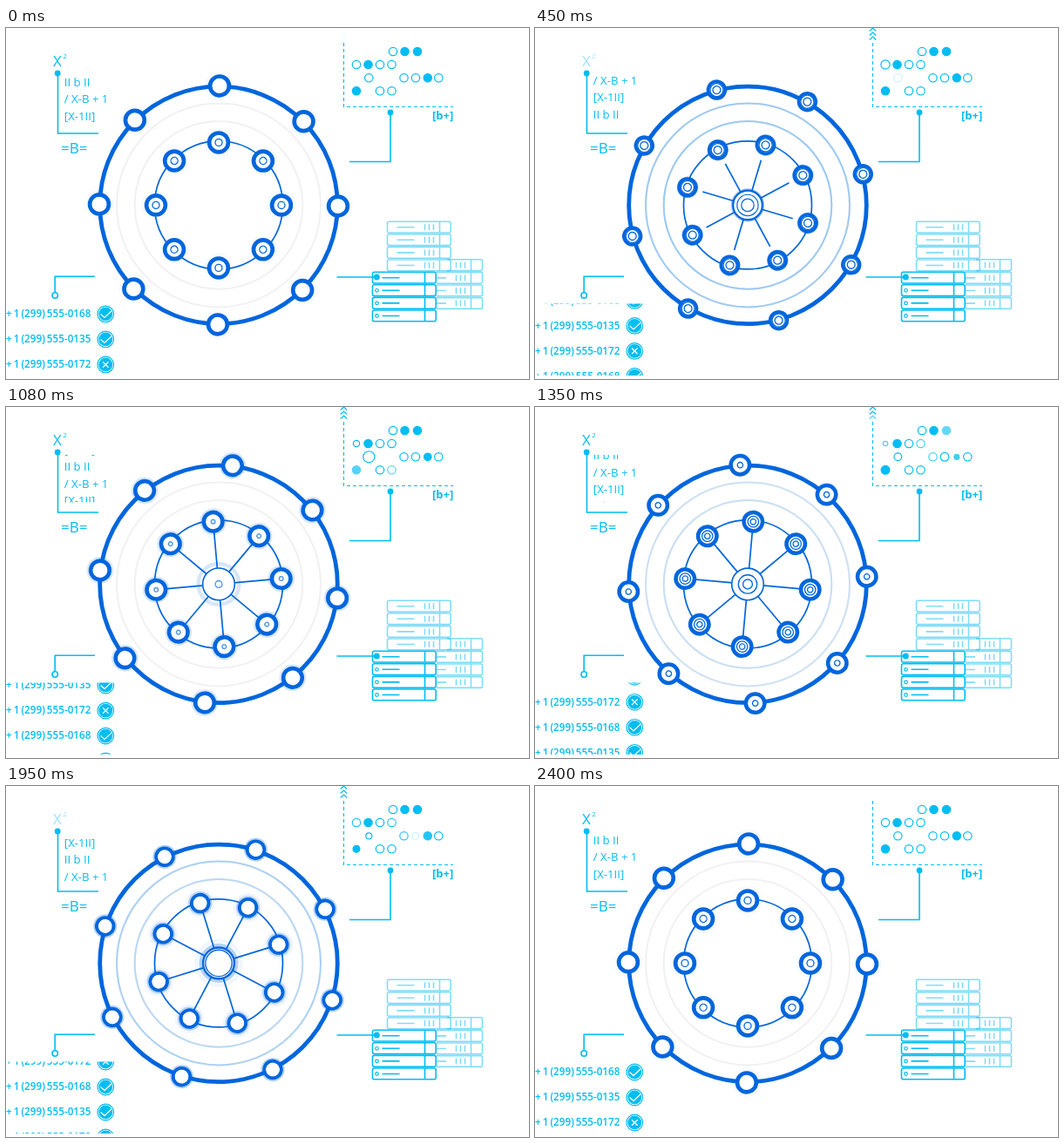
An HTML page for the animation above (2.43 s loop, 600 by 403 pixels).

```html
<!DOCTYPE html>
<html lang="en">
<head>
<meta charset="utf-8">
<title>Network pulse</title>
<style>
  html, body { margin: 0; width: 100%; height: 100%; overflow: hidden; background: #fff; }
  svg { display: block; width: 600px; height: 403px; font-family: "Open Sans", sans-serif; --sky: #00bdf2; --blue: #0066dd; }
  text { fill: var(--sky); white-space: pre; }
  .line { fill: none; stroke: var(--sky); stroke-width: 1.6; }
  .thin { stroke-width: 1.2; }
  .dot { fill: var(--sky); }
  .pale { opacity: .5; }
  .ring { fill: none; stroke: var(--blue); }
  .body { fill: #fff; }
  .track { fill: none; stroke: #f1f1f3; stroke-width: 2; }
  .glow { fill: none; stroke: #9cc9f3; stroke-width: 2; }
  .formula { font-size: 13.2px; }
  .phone { font-size: 11.7px; font-weight: 600; word-spacing: -1px; }
  .mark { fill: none; stroke: #fff; stroke-width: 1.3; }
</style>
</head>
<body>
<svg viewBox="0 0 600 403">
  <defs>
    <clipPath id="formulaClip"><rect x="62" y="55" width="70" height="54.5"/></clipPath>
    <clipPath id="phoneClip"><rect y="316.5" width="130" height="82.5"/></clipPath>
    <g id="outNode"></g>
    <g id="inNode"></g>
  </defs>

  <g id="power">
    <text x="54" y="44" font-size="17">X</text>
    <text x="65.3" y="35" font-size="8">2</text>
  </g>
  <path class="line" d="M59.5 52V121H106"/>
  <circle class="dot" cx="59.2" cy="52" r="3.4"/>
  <g clip-path="url(#formulaClip)"><g id="formulas"></g></g>
  <text x="63" y="144" font-size="17">=B=</text>

  <path class="line" d="M56.2 304V285.2H102"/>
  <circle class="line" cx="56.2" cy="307" r="3.2"/>
  <g clip-path="url(#phoneClip)"><g id="phones"></g></g>

  <path class="line" d="M387.5 17V90.5H513" stroke-dasharray="4 3" style="stroke-width:1.1"/>
  <g id="chevrons"></g>
  <g id="dots"></g>
  <text x="489" y="104.5" font-size="13" font-weight="700">[b+]</text>
  <path class="line" d="M394 153.5H441V97"/>
  <circle class="dot" cx="441" cy="97" r="3.4"/>

  <g id="servers"></g>
  <path class="line" d="M379.5 286H425"/>
  <circle class="dot" cx="425.3" cy="286" r="3.5"/>

  <g transform="translate(244 203.4)">
    <circle class="track" r="117"/>
    <circle class="track" r="96.3"/>
    <circle class="glow" id="glowOut" r="117"/>
    <circle class="glow" id="glowIn" r="96.3"/>
    <circle class="ring" r="136.3" stroke-width="4.8"/>
    <circle class="ring" r="73.5" stroke-width="1.7"/>
    <g id="outer"></g>
    <g id="inner"><path id="spokes" class="ring" stroke-width="1.7"/></g>
    <g id="hub"></g>
  </g>
</svg>
<script>
const LOOP = 2430, SPAN = 2400, PULSE = 1200;
const $ = id => document.getElementById(id);

function set(el, attrs) {
  for (const name in attrs) el.setAttribute(name, attrs[name]);
  return el;
}
function add(parent, tag, attrs, text) {
  const el = document.createElementNS('http://www.w3.org/2000/svg', tag);
  if (text) el.textContent = text;
  return parent.appendChild(set(el, attrs));
}
const clamp = v => Math.max(0, Math.min(1, v));
const ramp = (a, b, t) => clamp((t - a) / (b - a));
const bump = x => Math.max(0, 1 - Math.abs(x));
const wave = x => Math.max(0, Math.sin(Math.PI * x));

// Scrolling lists
const formulas = ['II b II', '/ X-B + 1', '[X-1II]'];
for (let i = 0; i < 10; i++)
  add($('formulas'), 'text', { class: 'formula', x: 66.8, y: 66.8 + 19.5 * i }, formulas[i % 3]);

const phones = ['+ 1 (299) 555-0168', '+ 1 (299) 555-0135', '+ 1 (299) 555-0172'];
for (let i = 0; i < 7; i++) {
  const g = add($('phones'), 'g', { transform: `translate(0 ${328.5 + 29 * i})` });
  add(g, 'text', { class: 'phone', y: 3.7 }, phones[i % 3]);
  add(g, 'circle', { class: 'line thin', cx: 114.3, r: 9.3 });
  add(g, 'circle', { class: 'dot', cx: 114.3, r: 7.9 });
  add(g, 'path', { class: 'mark', d: i % 3 < 2 ? 'M108.5 0l4.5 4 8-7.5' : 'M111-3.3l6.6 6.6m0-6.6l-6.6 6.6' });
}

// Server racks
const bars = (x, m) => [0, 5, 10].map(d => `M${x + d} ${m - 3.5}v7`).join('');

function server(x, y, pale) {
  const m = y + 6.5, g = add($('servers'), 'g', { class: pale ? 'pale' : '' });
  add(g, 'rect', { class: 'line', x, y, width: 72.7, height: 12.8, rx: 2 });
  add(g, 'path', { class: 'line', d: `M${x + 60} ${y}v12.8M${x + 11} ${m}h20` + (pale ? bars(x + 43, m) : '') });
  if (!pale) add(g, 'circle', { class: 'line thin', cx: x + 5, cy: m, r: 1.8 });
}
function serverEnd(x, y) {
  const m = y + 6.5;
  add($('servers'), 'path', {
    class: 'line pale',
    d: `M${x} ${y}H544.5q2 0 2 2v8.8q0 2-2 2H${x}M533.5 ${y}v12.8` +
       bars(516.5, m) + (x < 500 ? `M${x} ${m}H505` : '')
  });
}
const rows = [0, 1, 2, 3].map(i => 14.6 * i);
rows.forEach(dy => {
  serverEnd(dy ? 494 : 506, 265.8 + dy);
  server(437.5, 222.2 + dy, true);
});
rows.forEach(dy => server(420.5, 280.2 + dy, false));

// Scatter chart: x, y, filled, moment of swelling, moment of fading
const dots = [
  [444, 27, 0], [457.5, 27, 1], [472, 27, 1, , 1550],
  [402, 42, 0, 680, 1600], [415.5, 42, 1], [429, 42, 0], [442.5, 42, 0, , 1620],
  [416.3, 57.3, 0, 1080, 450], [456.5, 57.3, 0, , 1620], [470, 57.3, 0, 1620, 1950],
  [483.8, 57.3, 1, 800, 1620], [496.3, 57.3, 0],
  [402, 72.3, 1, 1620, 850], [429, 72.3, 0], [442.5, 72.3, 0, , 850]
].map(([cx, cy, full, swell = -SPAN, fade = -SPAN]) => ({
  el: add($('dots'), 'circle', { class: 'line thin', cx, cy, style: full ? 'fill:var(--sky)' : '' }),
  swell, fade
}));

function drawDots(t) {
  const settle = ramp(SPAN, SPAN - 200, t);
  dots.forEach(({ el, swell, fade }) => {
    const grow = .4 * bump((t - swell) / 300) - .45 * bump((t - swell - 650) / 500);
    set(el, { r: 4.7 * (1 + settle * grow), opacity: 1 - .8 * settle * bump((t - fade) / 400) });
  });
}

const chevrons = [13.5, 8.5, 3.5].map(y =>
  add($('chevrons'), 'path', { class: 'line thin', d: `M383.7 ${y}l3.8-3.5 3.8 3.5` }));

// A disc whose ripples grow from the middle, merge with the rim and leave as halos
function glyph(id, births, reach, rim) {
  const ripple = () => add($(id), 'circle', { class: 'ring' });
  const halos = births.map(ripple);
  const disc = set(ripple(), { class: 'ring body' });
  const rings = births.map(ripple);

  return u => {
    set(disc, rim(Math.sin(Math.PI * u) ** 2));
    births.forEach((birth, i) => {
      const age = ((u - birth + 1) % 1) / .6, out = age - 1;
      set(rings[i], {
        r: reach * Math.min(age, 1), 'stroke-width': 1.3,
        opacity: age < 1 ? clamp(6 * age - .6) : 0
      });
      set(halos[i], {
        r: reach * (1 + Math.max(out, 0)), 'stroke-width': 2 + reach / 8,
        opacity: out > 0 ? .4 * clamp(1 - 2 * out) : 0
      });
    });
  };
}
const births = [-.23, -.055, .12];
const nodeRim = k => ({ r: 10.9 - 1.2 * k, 'stroke-width': 4.7 - 1.2 * k });
const hubRim = k => ({ r: 18.4 - .6 * k, 'stroke-width': 1.5 + k });
const glyphs = [
  glyph('outNode', births.slice(1), 10.5, nodeRim),
  glyph('inNode', births, 10.5, nodeRim),
  glyph('hub', births, 18, hubRim)
];

const turns = rows.flatMap((_, i) => [90 * i, 90 * i + 45]);
turns.forEach(a => {
  add($('outer'), 'use', { href: '#outNode', transform: `rotate(${a}) translate(0 -137)` });
  add($('inner'), 'use', { href: '#inNode', transform: `rotate(${a}) translate(0 -72)` });
});

function spokes(len) {
  return turns.map(a => {
    const x = Math.sin(a * Math.PI / 180), y = -Math.cos(a * Math.PI / 180);
    return `M${x * 17} ${y * 17}L${x * len} ${y * len}`;
  }).join('');
}

function draw(now) {
  const t = Math.min(now % LOOP, SPAN), p = t / SPAN, beat = (t % PULSE) / PULSE;
  const eased = p - .007 * Math.sin(Math.PI * p);

  // The outer wheel starts a little slower than the inner one
  const lag = 1.8 * Math.sin(Math.PI * p ** .75);
  set($('outer'), { transform: `rotate(${.45 - 90 * p + lag})` });
  set($('inner'), { transform: `rotate(${90 * eased})` });
  glyphs.forEach(g => g(beat));
  set($('glowOut'), { opacity: wave(Math.min(beat / .9, 1)) });
  set($('glowIn'), { opacity: wave(Math.min(beat / .8, 1)) });

  const reach = Math.min(ramp(180, 510, t), ramp(2330, 2100, t));
  set($('spokes'), { d: reach ? spokes(17 + 45 * reach) : '' });
  const shown = Math.min(ramp(0, 500, t) ** .6, ramp(SPAN, 2250, t));
  set($('hub'), { transform: `scale(${shown})` });

  set($('formulas'), { transform: `translate(0 ${-117 * eased})` });
  set($('phones'), { transform: `translate(0 ${-87 * eased + .7 * Math.sin(Math.PI * p)})` });

  const blink = t % 1500;
  set($('power'), { opacity: 1 - Math.min(ramp(0, 260, blink), ramp(620, 340, blink)) });

  const c = t % 800;
  chevrons.forEach((el, i) => set(el, {
    opacity: Math.min(ramp(0, 20 + 20 * i, c), ramp(620 + 30 * i, 520 + 30 * i, c))
  }));
  drawDots(t);
}

function tick() {
  draw(performance.now());
  requestAnimationFrame(tick);
}
tick();
</script>
</body>
</html>
```
